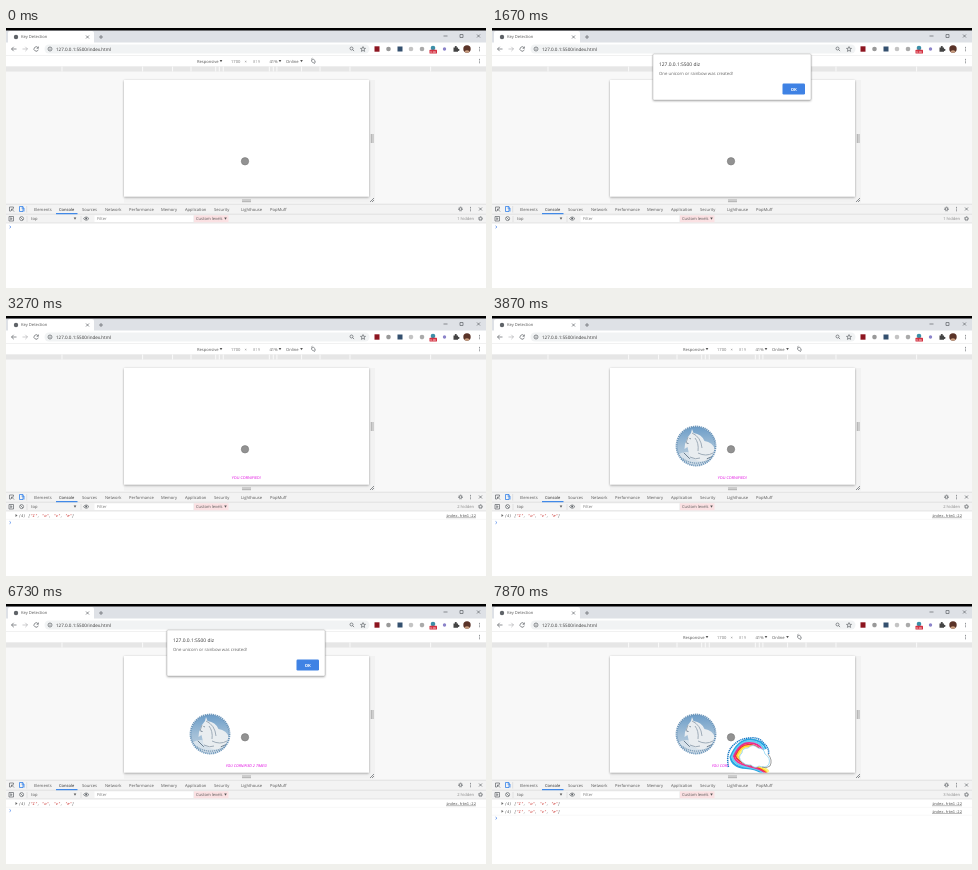
These frames come from a looping animation (480x260 px, 8 s). An HTML page:

```html
<!DOCTYPE html>
<html lang="en">
<head>
<meta charset="utf-8">
<title>Key Detection</title>
<style>
html, body { margin: 0; width: 100%; height: 100%; overflow: hidden; background: #fff; }
svg { display: block; width: 100vw; height: 100vh; }
text { font: 4.1px "Open Sans", "Noto Sans", sans-serif; fill: #555; text-rendering: geometricPrecision; white-space: pre; }
.log text { font: 3.85px "Noto Sans Mono", "DejaVu Sans Mono", monospace; }
.line { fill: none; stroke: #5f6368; stroke-width: .7; }
.glitter { fill: none; stroke-dasharray: 1.3 .7; }
.corn { font: 3.8px "Open Sans", sans-serif; fill: #e000e0; text-anchor: middle; }
</style>
</head>
<body>
<svg viewBox="0 0 480 260">
  <defs>
    <clipPath id="page"><rect x="118" y="52" width="245" height="116.5"/></clipPath>
    <clipPath id="below"><rect x="150" y="23.5" width="180" height="60"/></clipPath>
    <clipPath id="disc"><circle cx="204" cy="130" r="19.3"/></clipPath>
    <filter id="shadow" x="-10%" y="-20%" width="120%" height="150%">
      <feDropShadow dx="0" dy=".8" stdDeviation="1.1" flood-opacity=".4"/>
    </filter>
    <linearGradient id="sky" x2="0" y2="1">
      <stop stop-color="#6c9dc8"/><stop offset=".5" stop-color="#9fbdd6"/><stop offset="1" stop-color="#c3d3e0"/>
    </linearGradient>
    <g id="gear" class="line"><circle r="1.3"/><circle r="2" stroke-dasharray=".9 .67"/></g>
    <g id="dots" fill="#5f6368"><circle cy="-1.7" r=".5"/><circle r=".5"/><circle cy="1.7" r=".5"/></g>
    <path id="down" d="M-1.3-1h2.6L0 1.2z" fill="#555"/>
    <path id="cross" class="line" d="M-1.5-1.5l3 3m0-3l-3 3"/>
  </defs>

  <!-- tab strip and address bar -->
  <rect width="480" height="15" fill="#dee1e6"/>
  <rect width="480" height="2.5"/>
  <path d="M2 15V5q0-2 2-2h82q2 0 2 2v10z" fill="#fff"/>
  <circle cx="10" cy="9" r="2.2" fill="#5f6368"/>
  <text x="15" y="10.4" font-size="4" fill="#333">Key Detection</text>
  <use href="#cross" x="81.5" y="9"/>
  <path class="line" d="M93 9h4m-2-2v4M437.500 8h4M454 6.500h3v3h-3z"/>
  <use href="#cross" x="472.500" y="8"/>
  <rect y="14.500" width="480" height="13" fill="#fff"/>
  <rect x="38.500" y="16.500" width="325" height="9" rx="4.500" fill="#f1f3f4"/>
  <path class="line" d="M10.500 21h-5m2.200-2.200L5.500 21l2.200 2.200"/>
  <path class="line" d="M16.500 21h5m-2.200-2.200l2.200 2.200-2.200 2.200" opacity=".45"/>
  <path class="line" d="M32 19.700a2.200 2.200 0 1 0 .3 2M32.400 18.500v1.800h-1.800"/>
  <g class="line"><circle cx="44" cy="21" r="2"/><path d="M44 20.600v1.500m0-2.400v.5"/>
    <circle cx="345.500" cy="20.500" r="1.500"/><path d="M346.600 21.600l1.500 1.500"/>
    <path d="M357 18.600l.7 1.700 1.800.1-1.400 1.200.5 1.800-1.600-1-1.600 1 .5-1.800-1.400-1.200 1.800-.1z"/></g>
  <text x="50" y="22.600" style="font-size:4.55px;fill:#333">127.0.0.1:5500/index.html</text>
  <rect x="368.500" y="18.300" width="5" height="5.400" fill="#8d1520"/>
  <circle cx="382.500" cy="21" r="2.300" fill="#999"/>
  <rect x="391.500" y="18.500" width="5" height="5" fill="#34506f"/>
  <circle cx="405" cy="21" r="2.300" fill="#c4c4c4"/>
  <circle cx="416" cy="21" r="2.300" fill="#aaa"/>
  <circle cx="427" cy="20" r="2.300" fill="#3c8fa8"/>
  <rect x="423.500" y="21.800" width="7.500" height="3.700" rx=".6" fill="#d32f3f"/>
  <text x="424.300" y="24.800" style="font-size:2.9px;fill:#fff">0.00</text>
  <circle cx="438.500" cy="21" r="1.700" fill="#8b83c9"/>
  <path d="M447.500 19.500h1.400a1 1 0 1 1 1.800 0h1.300v1.500a1 1 0 1 1 0 1.700v1h-4.500z" fill="#444"/>
  <circle cx="461" cy="21" r="3.700" fill="#5a3328"/>
  <path d="M458.300 23.500q2.700-2.300 5.400 0a3.700 3.700 0 0 1-5.400 0z" fill="#c99e80"/>
  <use href="#dots" x="473.500" y="21"/>

  <!-- device toolbar, width ruler and emulated page -->
  <rect y="27.500" width="480" height="149" fill="#f8f8f8"/>
  <rect y="27.500" width="480" height="10.500" fill="#fff"/>
  <path d="M0 27.500h480" stroke="#ddd" stroke-width=".4"/>
  <g id="device"></g>
  <path class="line" d="M305.200 33l2-2 2.200 2-2 2zM305 31.500l1.500-1.300m3 4.200l-1.500 1.300"/>
  <use href="#dots" x="473.500" y="33"/>
  <rect y="38.500" width="480" height="5" fill="#e6e6e6"/>
  <g id="ruler" stroke="#fff" stroke-width=".8"></g>
  <rect x="118" y="52" width="251" height="122.500" fill="#f2f2f2"/>
  <rect x="118" y="52" width="245" height="116.500" fill="#fff" filter="url(#shadow)"/>
  <path d="M365.300 106v9m1.700-9v9M236 172h9m-9 1.700h9" stroke="#999" stroke-width=".8"/>
  <path class="line" d="M364 174l4-4m-2 4l2-2"/>

  <!-- developer tools -->
  <rect y="176" width="480" height="19" fill="#f3f3f3"/>
  <rect y="195" width="480" height="65" fill="#fff"/>
  <path d="M0 176.200h480M0 186.200h480M0 195h480M20.700 178v6.500M21 188v6M75 188v6" stroke="#ccc" stroke-width=".5"/>
  <path class="line" d="M3.500 179h4v1.500m-4-1.500v4h1.500M5.500 181l2.500 2.500m-2.500-2.500v2m0-2h2"/>
  <path class="line" d="M13.500 178.500h3.500v5h-3.500zM15.500 180h2.500v3.500" style="stroke:#1a73e8"/>
  <path d="M50 185.700h21.500" stroke="#1a73e8"/>
  <g id="tabs"></g>
  <use href="#gear" x="454.500" y="181"/><use href="#dots" x="464.500" y="181"/><use href="#cross" x="474.500" y="181"/>
  <path class="line" d="M3 188.500h4.500v4.500H3zM4.700 189.700l1.500 1-1.500 1zM14.300 189.300l2.600 2.600"/>
  <circle class="line" cx="15.600" cy="190.600" r="2"/>
  <text x="25" y="192">top</text><use href="#down" x="69" y="190.600"/>
  <path class="line" d="M77.500 190.600q2.700-3.200 5.400 0-2.700 3.200-5.400 0z"/><circle cx="80.200" cy="190.600" r="1" fill="#5f6368"/>
  <rect x="88.500" y="187.500" width="98.500" height="6.500" fill="#fff"/>
  <text x="91" y="192" style="fill:#777">Filter</text>
  <rect x="188" y="187.300" width="34.500" height="7" fill="#fbe1e3"/>
  <text x="190" y="192">Custom levels</text><use href="#down" x="219.500" y="190.600"/>
  <text id="hidden" x="468" y="192" text-anchor="end" style="fill:#888"></text>
  <use href="#gear" x="474.500" y="190.600"/>
  <g id="logs" class="log"></g>
  <path id="prompt" d="M3.500-1.200L5 0 3.500 1.200" fill="none" stroke="#4d86e8" stroke-width=".7"/>

  <!-- page content -->
  <g clip-path="url(#page)">
    <text id="corn" class="corn" x="240.300" y="163.300"></text>
    <g id="horse">
      <circle cx="204" cy="130" r="19.300" fill="url(#sky)"/>
      <g clip-path="url(#disc)">
        <path d="M184 140q9-7 19-2t22-3v16h-41z" fill="#d7e2eb"/>
        <path d="M193 128l3-7 3-4 1-4 1.500 4q8 1 11 8 8 1 11 9l-2 9q-9 4-18 1l-6-4-2-9-3 2z" fill="#e9edf0"/>
        <path d="M200 117q9 4 10 15m-7-10q4 5 3 13m-10-14l-2 6m12 10q8 4 15 0m-23 4q6 3 10 1" fill="none" stroke="#9eabb7" stroke-width="1"/>
        <path d="M194.500 127l2 .5m1-5l1.300.3m-7 14l6 6m17 0l7-3" stroke="#52677a" stroke-width=".8"/>
        <path d="M186 139q7 7 16 8t18-5" class="glitter" stroke="#7f9fba" stroke-width="1.300"/>
      </g>
      <circle class="glitter" cx="204" cy="130" r="19.500" stroke="#6d96ba" stroke-width="1.800"/>
    </g>
    <g id="rainbow" fill="none">
      <path d="M237 163q-3-15 5-22 7-7 17-7 9-1 13 5 6 5 5 11 4 6 1 12-5 4-10 2l4 6h-28z" fill="#fff"/>
      <g id="bands"></g>
      <path d="M250 158q-5-5 0-9 0-5 6-5 5-5 10 0 6 0 7 6 6 4 4 10-3 5-10 2-4 3-8-1-5 1-9-3z" fill="#fff" stroke="#8ed3f2" stroke-width=".8"/>
      <path class="glitter" d="M236.500 163q-3-15 5-22 7-7 17-7 9-1 13 5 6 5 5 11" stroke="#1878c4" stroke-width="1.500"/>
      <path d="M276 150q5 6 2 12-4 3-8 1" stroke="#777" stroke-width=".7"/>
    </g>
  </g>
  <circle cx="239" cy="133.300" r="3.700" fill="#929292" stroke="#777" stroke-width=".6"/>

  <!-- alert -->
  <g clip-path="url(#below)">
    <g id="alert">
      <rect x="161" y="26" width="158" height="46" rx="1.200" fill="#fff" filter="url(#shadow)"/>
      <rect x="161" y="26" width="158" height="46" rx="1.200" fill="none" stroke="#aaa" stroke-width=".4"/>
      <text x="167" y="38" style="font-size:4.9px;fill:#333">127.0.0.1:5500 diz</text>
      <text x="167" y="47.300" style="font-size:4.3px;fill:#666">One unicorn or rainbow was created!</text>
      <rect x="290.500" y="55.500" width="22.500" height="11" rx="1.200" fill="#3f82e4"/>
      <text x="301.700" y="62.600" text-anchor="middle" style="font-size:4.2px;font-weight:700;fill:#fff">OK</text>
    </g>
  </g>
</svg>
<script>
const $ = id => document.getElementById(id);
const label = (x, y, s, fill = "#555") => `<text x="${x}" y="${y}" style="fill:${fill}">${s}</text>`;
const arrow = (x, y) => `<use href="#down" x="${x}" y="${y}"/>`;

$("device").innerHTML = label(191, 34.5, "Responsive") + arrow(215, 33) + label(225, 34.5, "1700", "#777") +
  label(238.5, 34.5, "×", "#777") + label(247, 34.5, "819", "#999") +
  label(263.5, 34.5, "41%") + arrow(274, 33) + label(280, 34.5, "Online") + arrow(295.5, 33);

// Breakpoints are centred and drawn at the page zoom
$("ruler").innerHTML = [320, 375, 425, 768, 1024, 1440, 2560].map(w =>
  [-1, 1].map(s => `<path d="M${240.3 + s * w * .072} 38.500v5"/>`).join("")).join("");

const tabs = { Elements: 28, Console: 53, Sources: 76, Network: 99, Performance: 123, Memory: 155,
  Application: 179, Security: 208, Lighthouse: 235, PopMuff: 264 };
$("tabs").innerHTML = Object.entries(tabs).map(([name, x]) =>
  label(x, 182.6, name, name === "Console" ? "#222" : "#555")).join("");

const letters = [..."love"].map(c => `<tspan fill="#c41a16" style="fill:#c41a16">"${c}"</tspan>`).join(", ");
$("logs").innerHTML = [199.5, 207.3].map(y => `<g>
  <path d="M9.500 ${y - 1.4}l2 1.400-2 1.400z" fill="#666"/>
  <text x="12.500" y="${y + 1.3}" font-style="italic" style="font-style:italic">(4) [${letters}]</text>
  <text x="440" y="${y + 1.2}" text-decoration="underline">index.html:22</text>
  <path d="M0 ${y + 3.9}h480" stroke="#eee" stroke-width=".4"/></g>`).join("");

$("bands").innerHTML = ["#28a5e2", "#65cdf3", "#e92c91", "#ee3b35", "#ffd92e", "#fff27a"].map((c, i) => {
  const d = i * 1.7;
  return `<path d="M${274 - d} ${145 + d / 3}Q${270 - d} ${135.5 + d} ${258 - d / 4} ${135.5 + d}
    T${238.5 + d} ${153 - d / 5}Q${240 + d} ${163 - d} ${254 + d} ${164 - d / 2}T${272 + d / 2} ${172 - d / 2}"
    stroke="${c}" stroke-width="1.900"/>`;
}).join("");

const ramp = (t, from, to) => Math.min(1, Math.max(0, (t - from) / (to - from)));
const show = (el, on) => el.style.opacity = +on;

function draw(t) {
  const open = t < 4500 ? ramp(t, 1440, 1670) - ramp(t, 3080, 3270)
                        : ramp(t, 5340, 5530) - ramp(t, 6740, 6930);
  show($("alert"), open);
  $("alert").setAttribute("transform", `translate(0 ${-6 * (1 - open)})`);

  const twice = t >= 6730;
  $("corn").textContent = t < 3070 ? "" : twice ? "YOU CORNIFIED 2 TIMES!" : "YOU CORNIFIED!";
  $("corn").style.fontStyle = twice ? "italic" : "normal";

  const rows = (t >= 3130) + (t >= 6790);
  [...$("logs").children].forEach((row, i) => show(row, i < rows));
  $("prompt").setAttribute("transform", `translate(0 ${199 + 7.6 * rows})`);
  $("hidden").textContent = `${rows + 1} hidden`;

  show($("horse"), ramp(t, 3620, 3870));
  show($("rainbow"), ramp(t, 7210, 7870));
}

function tick() {
  draw(performance.now() % 8000);
  requestAnimationFrame(tick);
}
tick();
</script>
</body>
</html>
```
